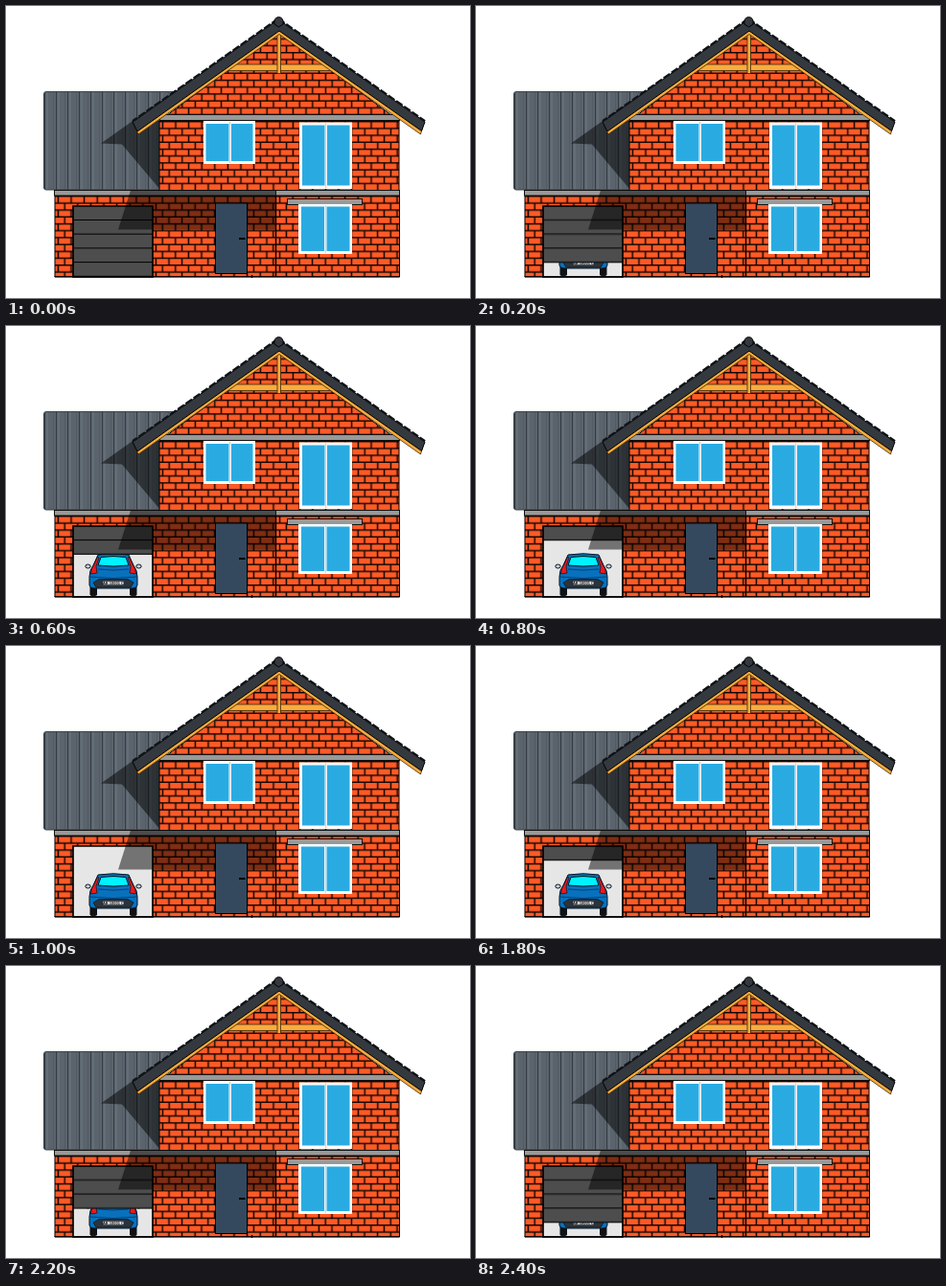
An HTML page for the animation above (2.6 s loop, 484x305 px).

```html
<!DOCTYPE html>
<html lang="en">
<head>
<meta charset="utf-8">
<title>House with garage</title>
<style>
  html, body { margin: 0; width: 100%; height: 100%; overflow: hidden; background: #fff; }
  svg { display: block; width: 100%; height: 100%; }
  .line { stroke: #000; stroke-width: 1; }
  .beam { fill: #999; stroke: #111; stroke-width: 1; }
  .wood { fill: #fbac3b; stroke: #3a2a10; stroke-width: .8; }
  .glass { fill: #29abe2; }
  .frame { fill: #fff; }
  .shade { fill: #000; fill-opacity: .5; }
  .shutter { animation: lift 2600ms step-end infinite; }
  @keyframes lift {
    0% { transform: translateY(0); }
    7.692% { transform: translateY(-14.7px); }
    15.385% { transform: translateY(-29.4px); }
    23.077% { transform: translateY(-44.1px); }
    30.769% { transform: translateY(-58.8px); }
    38.462% { transform: translateY(-76px); }
    69.231% { transform: translateY(-58.8px); }
    76.923% { transform: translateY(-44.1px); }
    84.615% { transform: translateY(-29.4px); }
    92.308%, 100% { transform: translateY(-14.7px); }
  }
</style>
</head>
<body>
<svg viewBox="0 0 484 305">
  <defs>
    <pattern id="brick" width="13.6" height="14.4" patternUnits="userSpaceOnUse">
      <rect width="13.6" height="14.4" fill="#ff5a26"/>
      <path d="M0 .7H13.6M0 7.9H13.6M3.4 0V7.2M10.2 7.2V14.4" stroke="#0c0502" stroke-width="1.5"/>
    </pattern>
    <pattern id="sheet" x="41" width="12" height="20" patternUnits="userSpaceOnUse">
      <rect width="12" height="20" fill="#5b646d"/>
      <path d="M2 0V20" stroke="#646e77" stroke-width="2"/>
      <path d="M11.500 0V20" stroke="#343b42"/>
      <path d="M8.500 0V20" stroke="#525b63"/>
    </pattern>
    <clipPath id="bay"><rect x="70" y="209" width="83" height="74"/></clipPath>
  </defs>
  <rect width="484" height="305" fill="#fff"/>

  <!-- side roof -->
  <path d="M42 89.5H176L150 120H161V192H42Q39.5 192 39.5 190V92Q39.5 89.5 42 89.5Z" fill="url(#sheet)" stroke="#3c444b"/>
  <path class="shade" d="M99 143.5L135 118H161V192L121 144.5Z"/>

  <!-- walls -->
  <g transform="translate(160 120)">
    <path d="M0 0L125 -93L250 0V73H0Z" fill="url(#brick)" class="line"/>
  </g>
  <g transform="translate(51 198)">
    <path d="M0 0H359.5V85H0Z" fill="url(#brick)" class="line"/>
  </g>
  <path d="M281.5 193V283M256.5 281V284" stroke="#000" stroke-width="1.4"/>
  <rect class="beam" x="160.5" y="113.5" width="250" height="6"/>
  <rect class="beam" x="50.5" y="192.5" width="231" height="5.5"/>
  <rect class="beam" x="281.5" y="192.5" width="129" height="5.5"/>
  <rect class="beam" x="293.5" y="201.5" width="78" height="6"/>

  <!-- garage -->
  <rect x="70" y="209" width="83" height="74" fill="#e6e6e6"/>
  <g id="car" stroke="#071522" stroke-width="1" stroke-linejoin="round">
    <path d="M88 268H94.500V281Q91 282.500 88 281ZM129.500 268H136V281Q133 282.500 129.500 281Z" fill="#111"/>
    <ellipse cx="85.500" cy="251" rx="2.700" ry="2" fill="#c9d2d8"/>
    <ellipse cx="138.500" cy="251" rx="2.700" ry="2" fill="#c9d2d8"/>
    <path d="M96 239Q112 236.500 128 239L133 250Q137 255 137 262V271Q136 274 132 274H92Q88 274 87 271V262Q87 255 91 250Z" fill="#0871bd"/>
    <path d="M99 241.500Q112 239.500 125 241.500L128 250Q112 252 96 250Z" fill="#00f2ff"/>
    <path id="lamp" d="M95.500 241L97 242L94 251L95 258L88.500 259Q88.500 253 92 249Z" fill="#f01818" stroke-width=".7"/>
    <use href="#lamp" transform="matrix(-1 0 0 1 224 0)"/>
    <path d="M96 254Q112 256 128 254M88 262Q112 265 136 262" fill="none" stroke="#073e70"/>
    <path d="M91 268L97 264.500H127L133 268L130 273H94Z" fill="#2b343c" stroke-width=".7"/>
    <rect x="101" y="266.500" width="22" height="4" fill="#e8e8e8" stroke-width=".5"/>
    <text x="112" y="270" font-family="'Liberation Sans', sans-serif" font-size="4" font-weight="700" text-anchor="middle" fill="#111" stroke="none">AB 10001 C</text>
  </g>
  <g clip-path="url(#bay)">
    <g class="shutter">
      <rect x="70" y="209" width="83" height="74" fill="#4d4d4d"/>
      <path d="M70 223.500H153M70 238.200H153M70 252.900H153M70 267.600H153M70 282.300H153" stroke="#000" stroke-width="1"/>
    </g>
  </g>
  <path d="M70 283V209H153V283Z" fill="none" stroke="#000" stroke-width="1.700"/>
  <path d="M50.500 282.700H411" class="line"/>
  <path class="shade" d="M130 192.500H281V233.500H117Z"/>

  <!-- front door -->
  <rect class="line" x="218.500" y="206" width="33" height="73.500" fill="#34495e"/>
  <path d="M243 243H249.500" stroke="#000" stroke-width="2"/>

  <!-- windows -->
  <path class="frame" d="M206 120H260V165H206ZM306 121.500H361V191H306ZM305 207H361V259H305Z"/>
  <path class="glass" d="M208.500 123H232.500V162H208.500ZM235 123H257.500V162H235ZM309 124.500H332.500V187.500H309ZM335 124.500H358.500V187.500H335ZM308 209.500H332V256H308ZM334.500 209.500H358.500V256H334.500Z"/>
  <path d="M233.700 121V164M333.700 122.500V190M333.300 208V258" stroke="#aab4ba" stroke-width=".7"/>

  <!-- main roof -->
  <path class="wood" d="M235 61H335L343 67.500H227Z"/>
  <rect class="wood" x="283" y="28" width="3.500" height="42.500"/>
  <path class="wood" d="M134 125L285 24L435 125L432.500 134L285 29.500L138 134Z"/>
  <path d="M132 121L284 14L437 121L433.500 130.500L285 26L137 131Z" fill="#343940" class="line"/>
  <path d="M284 13.300L132 120.300M284 13.300L437 120.300" fill="none" stroke="#111417" stroke-width="2.400" stroke-dasharray="8 2"/>
  <path d="M280 19Q279 12 284.500 11.500Q290 12 289 19L284.500 22Z" fill="#343940" class="line"/>
</svg>
</body>
</html>
```
